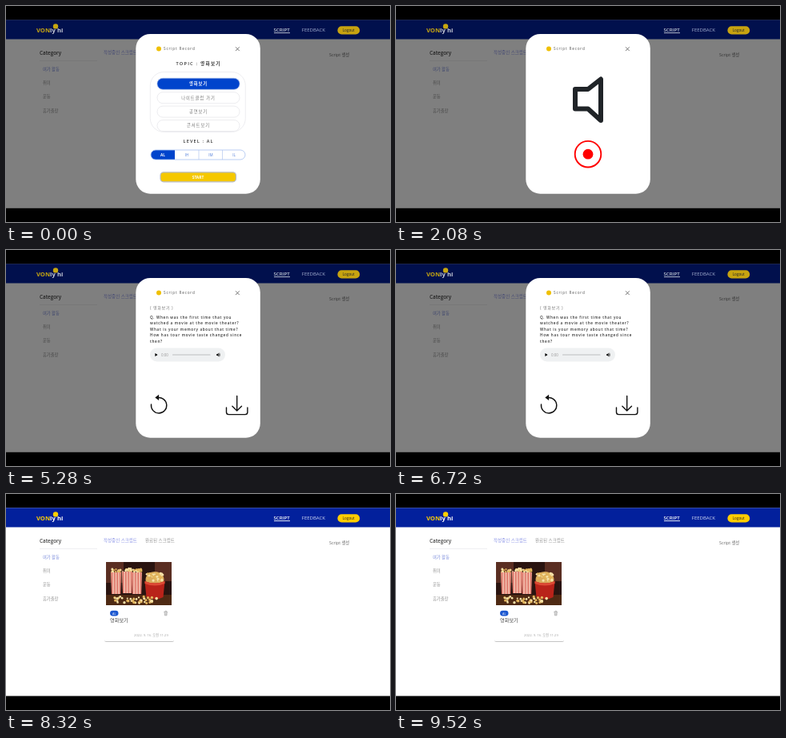
These frames come from a looping animation (480 px wide and 270 px high, 9600 ms). An HTML page:

```html
<!DOCTYPE html>
<html lang="ko">
<head>
<meta charset="utf-8">
<title>Script recorder</title>
<style>
html, body { margin: 0; width: 100%; height: 100%; overflow: hidden; background: #000; }
svg { display: block; width: 100vw; height: 100vh; }
text { font-family: "Open Sans", "Noto Sans CJK KR", "Noto Sans CJK", sans-serif; white-space: pre; }
.b { font-weight: 700; }
.s { font-weight: 600; }
.m { text-anchor: middle; }
.line { fill: none; stroke-linecap: round; stroke-linejoin: round; }
</style>
</head>
<body>
<svg viewBox="0 0 480 270">
  <defs>
    <filter id="shadow" x="-10%" y="-10%" width="120%" height="120%">
      <feDropShadow dx="0" dy=".9" stdDeviation=".6" flood-opacity=".25"/>
    </filter>
    <clipPath id="photo"><rect x="125" y="85" width="82" height="54"/></clipPath>
    <clipPath id="levels"><rect x="181" y="180" width="118" height="12" rx="6"/></clipPath>
  </defs>

  <!-- page -->
  <rect y="17.3" width="480" height="235.2" fill="#fff"/>
  <g font-size="5.3" fill="#929292">
    <text class="s" x="42" y="61" font-size="6.3" fill="#444">Category</text>
    <path d="M42 68.5H114" stroke="#e8e8ec" stroke-width=".7"/>
    <text x="46" y="80.5" fill="#7f8fdc">여가 활동</text>
    <text x="46" y="97.8">취미</text>
    <text x="46" y="115.3">운동</text>
    <text x="46" y="132.8">휴가출장</text>
    <text x="122" y="60" font-size="5.5" fill="#8a93e6">작성중인 스크립트</text>
    <text x="174" y="60" font-size="5.5">완료된 스크립트</text>
    <text x="404" y="62.7" fill="#666">Script 생성</text>
  </g>

  <!-- saved script -->
  <g id="card">
    <rect x="123" y="83" width="87" height="101" rx="2.5" fill="#fff" filter="url(#shadow)"/>
    <g id="picture" clip-path="url(#photo)">
      <rect x="125" y="85" width="82" height="54" fill="#2a1410"/>
      <path d="M125 85h22v26h-22zM186 85h21v24h-21z" fill="#5a2e22"/>
      <rect x="125" y="126" width="82" height="13" fill="#4e2a14"/>
    </g>
    <rect x="130" y="145.7" width="10.5" height="6.8" rx="3.4" fill="#1c58d0"/>
    <text class="m" x="135.2" y="150.5" font-size="3.8" fill="#fff">AL</text>
    <path class="line" d="M197.6 147.4h4.2M198.9 147v-.8h1.6v.8M198.1 148l.3 3.8h2.6l.3-3.8M199.1 148.6v2.4M200.3 148.6v2.4" stroke="#888" stroke-width=".5"/>
    <text x="130" y="159.8" font-size="6.2" fill="#444">영화보기</text>
    <text x="160" y="178.3" font-size="4.2" fill="#a4a4a4">2022. 9. 16. 오전 11:29</text>
  </g>

  <!-- header -->
  <rect y="17.3" width="480" height="24.2" fill="#02209c"/>
  <rect id="dim" y="17" width="480" height="235.5" opacity=".5"/>
  <g id="nav">
    <text class="b" x="38" y="33" font-size="7.6" fill="#ffd000">VON<tspan fill="#fff">ly</tspan></text>
    <text class="b" x="64" y="33" font-size="7.6" fill="#fff">hi</text>
    <circle cx="62" cy="25.4" r="3.2" fill="#ffd000"/>
    <text class="s" x="334.5" y="32" font-size="6.1" fill="#fff">SCRIPT</text>
    <path d="M335 33.6H355" stroke="#fff" stroke-width=".9"/>
    <text x="369.8" y="32" font-size="6" fill="#d5dcf5">FEEDBACK</text>
    <rect x="414.4" y="25.3" width="27.8" height="10.3" rx="5.1" fill="#ffcd00"/>
    <text class="m" x="428.2" y="32" font-size="4.6" fill="#222">Logout</text>
  </g>

  <!-- dialog -->
  <g id="dialog">
    <rect x="162.3" y="35" width="155.5" height="199.7" rx="18" fill="#fff"/>
    <circle cx="191" cy="53.5" r="3" fill="#f0c000"/>
    <text x="197" y="55.4" font-size="4.7" letter-spacing=".83" fill="#555">Script Record</text>
    <path d="M287 51.3l4.8 4.8m0-4.8l-4.8 4.8" stroke="#555" stroke-width=".8"/>

    <g id="choose">
      <g class="m s" font-size="5.6" fill="#333">
        <text x="240.6" y="73.6" letter-spacing="1.25">TOPIC : 영화보기</text>
        <text x="240.6" y="171.2" letter-spacing="1.1">LEVEL : AL</text>
      </g>
      <rect x="180.3" y="82.5" width="119" height="75" rx="17" fill="none" stroke="#e6e6ea" stroke-width=".7"/>
      <g id="topics" class="m" font-size="5.3" letter-spacing=".9"></g>
      <g clip-path="url(#levels)">
        <rect x="181" y="180" width="30" height="12" fill="#0044cc"/>
        <path d="M241 180v12M270.5 180v12" stroke="#b4c8f0" stroke-width=".7"/>
      </g>
      <rect x="181" y="180" width="118" height="12" rx="6" fill="none" stroke="#a8c0f0" stroke-width=".8"/>
      <g class="m" font-size="4.6" fill="#4a78d8">
        <text class="b" x="196" y="187.8" fill="#fff">AL</text>
        <text x="226" y="187.8">IH</text>
        <text x="256" y="187.8">IM</text>
        <text x="285" y="187.8">IL</text>
      </g>
      <rect x="193" y="207.8" width="94.5" height="12" rx="4" fill="#f5c800" stroke="#b9bdc8" stroke-width="1.2"/>
      <text class="m b" x="240" y="215.6" font-size="4.9" fill="#fff">START</text>
    </g>

    <g id="record">
      <path class="line" d="M224 104H240L256 91.5V143L240 128.5H224Z" stroke="#202428" stroke-width="6"/>
      <circle cx="240" cy="185.2" r="16.3" fill="none" stroke="#f00" stroke-width="1.9"/>
      <circle id="dot" cx="240" cy="185.2" r="6.4" fill="#f00"/>
      <rect id="stop" x="233.8" y="179" width="12.4" height="12.4" rx="2.5" fill="#f00"/>
    </g>

    <g id="result">
      <text x="180" y="73.5" font-size="5.1" letter-spacing=".6" fill="#777">( 영화보기 )</text>
      <g id="question" class="s" font-size="4.6" letter-spacing=".68" fill="#333"></g>
      <rect x="180" y="122.5" width="94" height="17" rx="8.5" fill="#eff1f2"/>
      <path d="M186.4 129v4l3.2-2z"/>
      <text x="194" y="132.6" font-size="4.5" fill="#999">0:00</text>
      <path class="line" d="M208.5 131H255" stroke="#bbbdbf" stroke-width="1.2"/>
      <path d="M263 130.2h1.1l1.5-1.5v4.6l-1.5-1.5h-1.1z"/>
      <path class="line" d="M266.2 129.8q.9 1.2 0 2.4M266.9 128.9q1.4 2.1 0 4.2" stroke="#000" stroke-width=".5"/>
      <g class="line" stroke="#111" stroke-width="1.4">
        <path d="M189 184.8A9.7 9.7 0 1 1 181.5 193"/>
        <path d="M288.7 182.5V201M282.9 195.3L288.7 201L294.5 195.3M275.5 197V202.8Q275.5 205.6 278.4 205.6H299Q301.9 205.6 301.9 202.8V197"/>
      </g>
      <path d="M186.3 184.4l4.8-3.6v7.2z" fill="#111"/>
    </g>
  </g>
</svg>
<script>
const LOOP = 9600;
const START = 1200, RECORDING = 3360, DONE = 5040, CLOSE = 7520;
const $ = id => document.getElementById(id);

function add(parent, tag, attrs, text = '') {
  const el = document.createElementNS('http://www.w3.org/2000/svg', tag);
  for (const key in attrs) el.setAttribute(key, attrs[key]);
  el.textContent = text;
  $(parent).append(el);
}

['영화보기', '나이트클럽 가기', '공연보기', '콘서트보기'].forEach((label, i) => {
  const y = 90.3 + i * 17.4, on = i === 0;
  add('topics', 'rect', { x: 189, y, width: 103, height: 14, rx: 7,
    fill: on ? '#0044cc' : '#fff', stroke: on ? '#9ab4e8' : '#e4e4e8', 'stroke-width': .7 });
  add('topics', 'text', { x: 240.5, y: y + 8.9, class: on ? 'b' : '',
    fill: on ? '#fff' : '#777' }, label);
});

['Q. When was the first time that you', 'watched a movie at the movie theater?',
 'What is your memory about that time?', 'How has tour movie taste changed since', 'then?']
  .forEach((line, i) => add('question', 'text', { x: 180, y: 85.7 + i * 7.5 }, line));

let seed = 7;
const random = () => (seed = seed * 16807 % 2147483647) / 2147483647;

function popcorn(count, x, y, w, h) {
  while (count--) add('picture', 'circle', { cx: x + random() * w, cy: y + random() * h,
    r: 1 + random() * .8, fill: random() < .5 ? '#f6e2a8' : '#e2b45c' });
}

function cup(x, y) {
  popcorn(20, x + 1, y - 4, 11, 5);
  add('picture', 'path', { d: `M${x} ${y}h13l-1 27h-11z`, fill: '#efb5a4' });
  for (let i = 0; i < 4; i++)
    add('picture', 'path', { d: `M${x + .8 + i * 3.4} ${y}h1.2v27h-1z`, fill: '#d9665a' });
}

cup(145, 97);
cup(131, 98);
cup(157, 98);
add('picture', 'ellipse', { cx: 186, cy: 107, rx: 11.5, ry: 10, fill: '#d9ab5c' });
popcorn(50, 176, 99, 20, 10);
add('picture', 'path', { d: 'M173.5 109q12.5 5 25 0l-2 20q-10.500 5 -21 0z', fill: '#b9231a' });
add('picture', 'path', { d: 'M173.5 109q12.5 5 25 0v3q-12.500 5 -25 0z', fill: '#dd4a34' });
popcorn(45, 134, 128, 56, 9);

const show = (id, on) => $(id).style.display = on ? '' : 'none';

function draw() {
  const t = performance.now() % LOOP, open = t < CLOSE;
  show('dim', open);
  show('dialog', open);
  show('card', !open);
  $('nav').style.opacity = open ? .78 : 1;
  show('choose', t < START);
  show('record', t >= START && t < DONE);
  show('dot', t < RECORDING);
  show('stop', t >= RECORDING);
  show('result', t >= DONE);
  requestAnimationFrame(draw);
}
draw();
</script>
</body>
</html>
```
